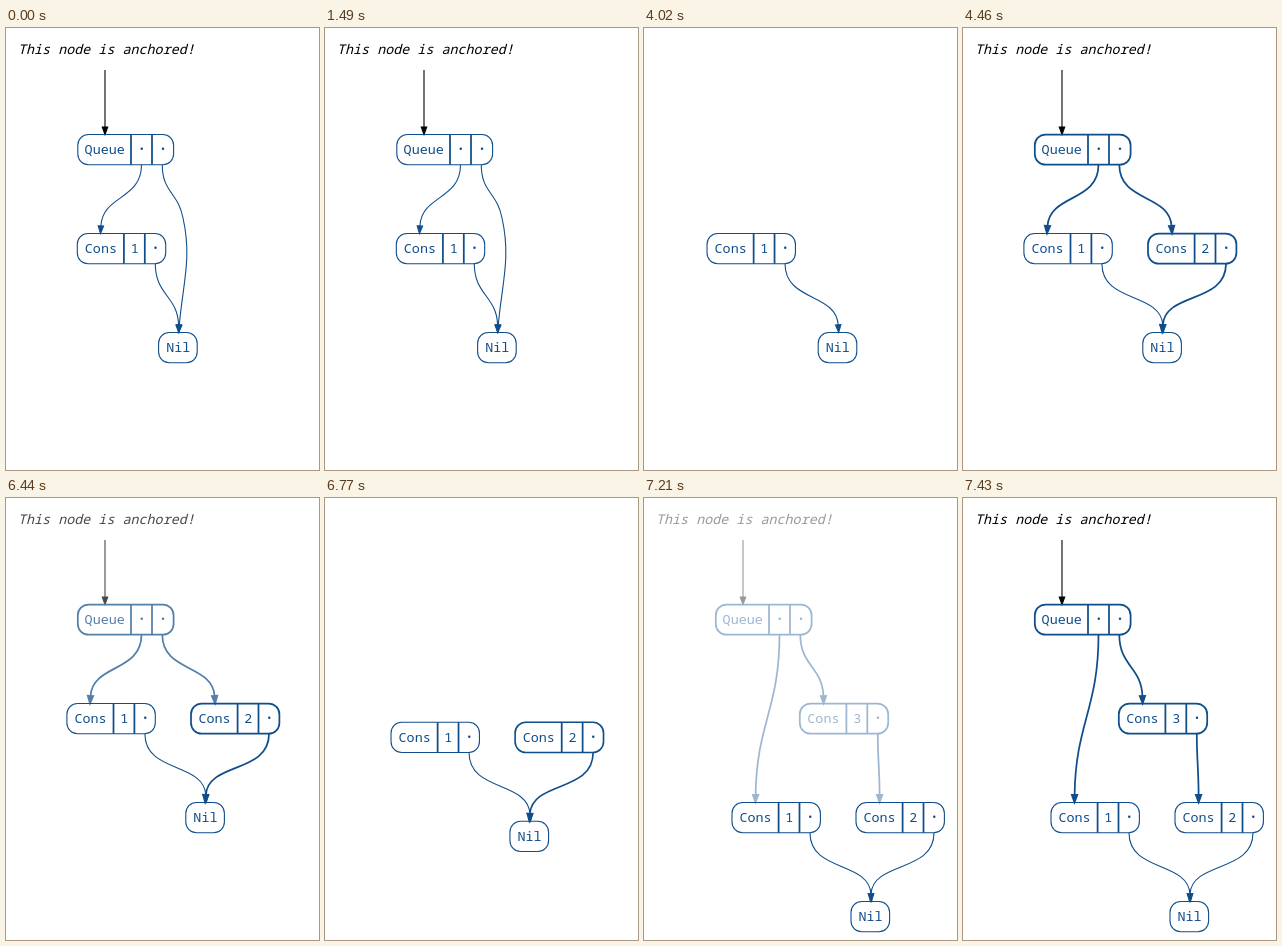
Recreate the animation shown at these times as an HTML page. Size 313 by 442 pixels, loop 8000 ms.

```html
<!DOCTYPE html>
<html lang="en">
<head>
<meta charset="utf-8">
<style>
  html, body { margin: 0; width: 100%; height: 100%; overflow: hidden; background: #fff; }
  svg { display: block; }
  text { font: 500 13.4px "Noto Sans Mono", "DejaVu Sans Mono", monospace; text-anchor: middle; }
  .dot { font-weight: 800; }
  .note { font-style: italic; }
</style>
</head>
<body>
<svg id="stage" width="313" height="442" viewBox="0 0 313 442"></svg>
<script>
const LOOP = 8000, PHASE = 364, BLUE = '#104e8b', THIN = 1.1, BOLD = 1.75;
const NODE_H = 30.2;

// Cells are [label, width]; ports are the x offsets where edges leave.
const cons = value => ({ cells: [['Cons', 46.6], [value, 20.9], ['·', 20.9]], ports: [78], top: 23.6 });
const kinds = {
  queue: { cells: [['Queue', 53.2], ['·', 21], ['·', 21.6]], ports: [63.7, 84.5], top: 27 },
  c1: cons('1'), c2: cons('2'), c3: cons('3'),
  nil: { cells: [['Nil', 38.6]], ports: [], top: 20 }
};

// Nodes: [x, y, stroke width]; edges: from, port, to, stroke width.
const scenes = [
  { start: 0,
    nodes: { queue: [71.8, 106.5, THIN], c1: [71.3, 205.5, THIN], nil: [152.6, 304.5, THIN] },
    edges: [['queue', 0, 'c1', THIN], ['queue', 1, 'nil', THIN], ['c1', 0, 'nil', THIN]] },
  { start: 3368,
    nodes: { queue: [71.8, 106.5, BOLD], c1: [60.9, 205.5, THIN], c2: [185, 205.5, BOLD], nil: [179.8, 304.5, THIN] },
    edges: [['queue', 0, 'c1', BOLD], ['queue', 1, 'c2', BOLD], ['c1', 0, 'nil', THIN], ['c2', 0, 'nil', BOLD]] },
  { start: 6338,
    nodes: { queue: [71.8, 106.5, BOLD], c3: [155.8, 205.5, BOLD], c1: [88, 304.5, THIN], c2: [212, 304.5, THIN], nil: [207, 403.5, THIN] },
    edges: [['queue', 0, 'c1', BOLD], ['queue', 1, 'c3', BOLD], ['c3', 0, 'c2', BOLD], ['c1', 0, 'nil', THIN], ['c2', 0, 'nil', THIN]] }
];

const clamp = v => Math.max(0, Math.min(1, v));
const mix = (a, b, t) => a + (b - a) * t;
const group = (opacity, content) => opacity > 0 ? `<g opacity="${opacity}">${content}</g>` : '';

function drawNode(name, [x, y, stroke]) {
  const { cells } = kinds[name];
  const total = cells.reduce((sum, cell) => sum + cell[1], 0);
  let lines = '', labels = '', left = x;
  cells.forEach(([label, width], i) => {
    if (i) lines += `M${left},${y}v${NODE_H}`;
    labels += `<text class="${label === '·' ? 'dot' : ''}" x="${left + width / 2 + 0.3}" y="${y + 19.7}" fill="${BLUE}">${label}</text>`;
    left += width;
  });
  return `<g fill="none" stroke="${BLUE}" stroke-width="${stroke}">
    <rect x="${x}" y="${y}" width="${total}" height="${NODE_H}" rx="10.7"/><path stroke-width="${BOLD}" d="${lines}"/></g>${labels}`;
}

function drawArrow(points, stroke, color) {
  const [cx, cy, x, y] = points.slice(-4);
  const len = Math.hypot(x - cx, y - cy), ux = (x - cx) / len, uy = (y - cy) / len;
  return `<g stroke="${color}" stroke-width="${stroke}">
    <path fill="none" d="M${points.slice(0, 2)}C${points.slice(2)}"/>
    <path fill="${color}" d="M${x - 2.7 * uy},${y + 2.7 * ux}L${x + 7.6 * ux},${y + 7.6 * uy}L${x + 2.7 * uy},${y - 2.7 * ux}Z"/></g>`;
}

function drawEdge([from, port, to, stroke], nodes) {
  const x0 = nodes[from][0] + kinds[from].ports[port], y0 = nodes[from][1] + NODE_H;
  const x1 = nodes[to][0] + kinds[to].top, y1 = nodes[to][1] - 7.6;
  const dx = x1 - x0, gap = y1 - y0;
  const points = from === 'queue' && to === 'nil'
    ? [x0, y0, x0, y0 + 28, 172, 164, 177, 190, 186, 230, 177, 255, x1 + 0.7, y1]
    : [x0, y0, x0, y0 + .43 * gap + .22 * Math.abs(dx),
       x1 - .04 * dx, y1 - .43 * gap - .11 * Math.abs(dx), x1, y1];
  return drawArrow(points, stroke, BLUE);
}

const anchor = '<text class="note" x="100.4" y="26">This node is anchored!</text>' +
  drawArrow([99, 42, 99, 60, 99, 80, 99, 99], THIN, '#000');

// Old parts fade out, shared parts glide, new parts fade in.
function render(time) {
  const index = scenes.findLastIndex(scene => time >= scene.start);
  const next = scenes[index], prev = scenes[Math.max(0, index - 1)];
  const phase = index ? (time - next.start) / PHASE : 3;
  const fadeOut = 1 - clamp(phase), move = clamp(phase - 1), fadeIn = clamp(phase - 2);
  const keyOf = edge => edge.slice(0, 3).join();
  const stays = name => name !== 'queue' && name in prev.nodes && name in next.nodes;

  const moving = {};
  for (const name in next.nodes) if (stays(name))
    moving[name] = next.nodes[name].map((v, i) => mix(prev.nodes[name][i], v, move));

  const sharedEdges = [];
  for (const edge of next.edges) {
    const old = prev.edges.find(e => keyOf(e) === keyOf(edge));
    if (old && edge[0] !== 'queue') sharedEdges.push([...edge.slice(0, 3), mix(old[3], edge[3], move)]);
  }
  const sharedKeys = sharedEdges.map(keyOf);

  const changing = ({ nodes, edges }) => anchor +
    Object.keys(nodes).filter(name => !stays(name)).map(name => drawNode(name, nodes[name])).join('') +
    edges.filter(edge => !sharedKeys.includes(keyOf(edge))).map(edge => drawEdge(edge, nodes)).join('');

  document.getElementById('stage').innerHTML =
    Object.keys(moving).map(name => drawNode(name, moving[name])).join('') +
    sharedEdges.map(edge => drawEdge(edge, moving)).join('') +
    group(fadeOut, changing(prev)) + group(fadeIn, changing(next));
}

const origin = performance.now();
function tick() {
  render((performance.now() - origin) % LOOP);
  requestAnimationFrame(tick);
}
tick();
</script>
</body>
</html>
```
